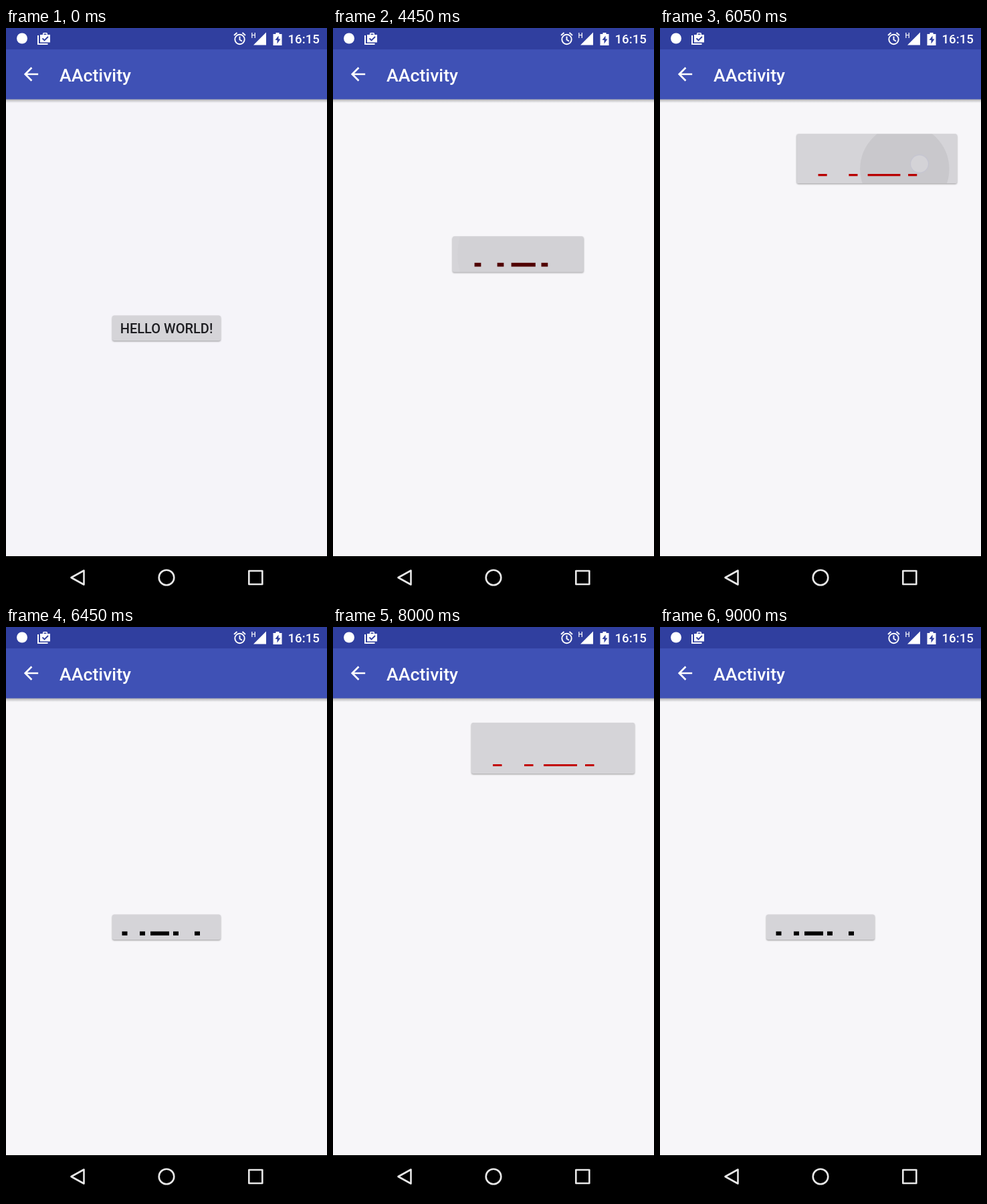
An HTML page that plays this animation: 480x853 px, repeating every 9.05 s.

```html
<!DOCTYPE html>
<html lang="en">
<head>
<meta charset="utf-8">
<title>Shared button transition</title>
<style>
  html, body { margin: 0; width: 100%; height: 100%; overflow: hidden; background: #000; }
  svg { display: block; width: 100%; height: 100%; }
  text { font-family: Roboto, sans-serif; font-weight: 500; }
</style>
</head>
<body>
<svg viewBox="0 0 480 853">
  <defs>
    <linearGradient id="barShade" x1="0" y1="0" x2="0" y2="1">
      <stop offset="0" stop-color="#000" stop-opacity=".3"/>
      <stop offset="1" stop-color="#000" stop-opacity="0"/>
    </linearGradient>
    <filter id="soft" x="-10%" y="-30%" width="120%" height="160%">
      <feGaussianBlur stdDeviation="1.3"/>
    </filter>
    <clipPath id="inside"><rect id="clip" rx="2.7"/></clipPath>
  </defs>

  <rect id="page" width="480" height="853"/>
  <rect y="106" width="480" height="6" fill="url(#barShade)"/>
  <rect y="31" width="480" height="75.5" fill="#3f51b5"/>
  <rect width="480" height="32" fill="#303f9f"/>

  <g fill="#fff">
    <circle cx="24" cy="15.5" r="8"/>
    <path d="M47 11v14h15.500v-2H49V11zM51 10h4V8.500Q55 7 56.500 7h4Q62 7 62 8.500V10h4v11.500H51zM56.500 10h4V8.500h-4z" fill-rule="evenodd"/>
    <path d="M54.500 15.500l3 3 5.500-5.500" fill="none" stroke="#303f9f" stroke-width="1.8"/>
    <g fill="none" stroke="#fff" stroke-width="1.9">
      <circle cx="349.500" cy="17" r="7.200"/>
      <path d="M349.500 12.500v5l3.500 2.200M341 11l4.500-4M358 11l-4.500-4"/>
    </g>
    <text x="366.500" y="15" font-size="10">H</text>
    <path d="M370 25.500h19V6.500z"/>
    <path d="M399.500 9h4V7h5v2h4v17h-13z"/>
    <path d="M407.500 11.500l-5 6.500h3v5.500l5-7h-3z" fill="#303f9f"/>
    <text x="421.500" y="23" font-size="18.67">16:15</text>
    <path transform="translate(21.500 53) scale(1.333)" d="M20 11H7.830l5.590-5.590L12 4l-8 8 8 8 1.410-1.410L7.830 13H20z"/>
    <text x="80" y="79.500" font-size="26.67">AActivity</text>
  </g>

  <rect id="shadow" rx="2.700" opacity=".34" filter="url(#soft)"/>
  <rect id="button" rx="2.700" fill="#d5d4d8"/>
  <circle id="ripple" clip-path="url(#inside)"/>
  <text id="label" x="240" y="456" font-size="20" text-anchor="middle" fill="#1c1c20">HELLO WORLD!</text>
  <path id="dashes"/>
  <circle id="touch" r="13.500" fill="#fafaff" stroke="#b9bbe0" stroke-width="1.300"/>

  <rect y="789" width="480" height="64" fill="#000"/>
  <g fill="none" stroke="#e8e8e8" stroke-width="2.600" stroke-linejoin="round">
    <path d="M97.500 821l19-10.500v21z"/>
    <circle cx="240" cy="821" r="11.300"/>
    <rect x="363.300" y="811" width="20" height="20"/>
  </g>
</svg>
<script>
const LOOP = 9050, STEP = 50, MOVE = 300;
const SMALL = { x: 159, y: 429.5, w: 162, h: 37.5 };
const LARGE = { x: 207, y: 143, w: 244, h: 76 };
const SMALL_DASHES = [[-66.5, 8], [-40, 8], [-24, 28], [10, 8], [42, 8]];
const LARGE_DASHES = [[-90, 13.5], [-43, 13.5], [-14, 50], [48, 13.5]];
const taps = [
  { at: 4000, start: 4355, open: true },
  { at: 5800, start: 6009, open: false },
  { at: 7150, start: 7505, open: true },
  { at: 8100, start: 8310, open: false }
];

const $ = id => document.getElementById(id);
const clamp = v => Math.max(0, Math.min(1, v));
const mix = (a, b, k) => a + (b - a) * k;
const set = (id, attrs) => {
  for (const k in attrs) $(id).setAttribute(k, attrs[k]);
};

// cubic-bezier(.4, 0, .2, 1)
function ease(x) {
  let lo = 0, hi = 1;
  for (let i = 0; i < 24; i++) {
    const s = (lo + hi) / 2, r = 1 - s;
    if (1.2 * s * r * r + 0.6 * s * s * r + s ** 3 < x) lo = s; else hi = s;
  }
  return x <= 0 ? 0 : x >= 1 ? 1 : lo * lo * (3 - 2 * lo);
}

function openness(t) {
  let p = 0;
  for (const tap of taps) {
    if (t < tap.start) break;
    const k = ease(clamp((t - tap.start) / MOVE));
    p = tap.open ? k : 1 - k;
  }
  return p;
}

function drawDashes(p, cx, cy) {
  const list = p ? LARGE_DASHES : SMALL_DASHES;
  const scale = p ? mix(0.53, 1, p) : 1;
  const h = 6 - 3 * p ** 3;
  const y = cy + mix(12.5, 27, p) - h;
  const d = list.map(([x, w]) => `M${cx + x * scale} ${y}h${w * scale}v${h}h${-w * scale}z`);
  set("dashes", { d: d.join(""), fill: `rgb(${Math.round(194 * p)},0,0)` });
}

function drawTap(t, box, cx, cy) {
  const tap = taps.findLast(a => t >= a.at);
  const age = tap ? t - tap.at : Infinity;
  const shown = age < 600;
  set("touch", { opacity: shown ? 0.78 * clamp((310 - age) / 210) : 0 });
  set("ripple", { opacity: shown ? 0.055 * clamp((520 - age) / 270) : 0 });
  if (!shown) return;
  const [x, y] = tap.open ? [306, 451] : [388, 203];
  const from = tap.open ? SMALL : LARGE;
  const k = clamp(age / 470), zoom = (1 - k * k) * box.w / from.w;
  set("touch", { cx: x, cy: y });
  set("ripple", {
    cx: cx + (x - from.x - from.w / 2) * zoom,
    cy: cy + (y - from.y - from.h / 2) * zoom,
    r: Math.hypot(box.w, box.h) / 2 * k
  });
}

function render(time) {
  const t = Math.floor(time % LOOP / STEP) * STEP;
  const p = openness(t), moved = t >= taps[0].start;
  const box = {};
  for (const k in SMALL) box[k] = mix(SMALL[k], LARGE[k], p);
  const cx = box.x + box.w / 2, cy = box.y + box.h / 2;
  const rect = { x: box.x, y: box.y, width: box.w, height: box.h };
  set("button", rect);
  set("clip", rect);
  set("shadow", { ...rect, y: box.y + 1.2 });
  set("page", { fill: moved ? "#f7f6f9" : "#f5f4f9" });
  set("label", { visibility: moved ? "hidden" : "visible" });
  set("dashes", { visibility: moved ? "visible" : "hidden" });
  drawDashes(p, cx, cy);
  drawTap(t, box, cx, cy);
}

const began = performance.now();
function tick() {
  render(performance.now() - began);
  requestAnimationFrame(tick);
}
tick();
</script>
</body>
</html>
```
